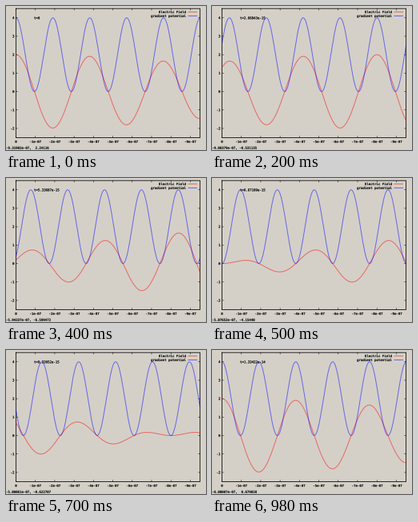
Animation of 250 by 181 pixels, one loop 1.08 s. Source, as a matplotlib script:

```python
import matplotlib.pyplot as plt
import numpy as np
from matplotlib.animation import FuncAnimation
from matplotlib.patches import PathPatch
from matplotlib.textpath import TextPath
from matplotlib.transforms import Affine2D

WIDTH, HEIGHT, DPI = 250, 181, 100
PX = 72 / DPI
LEFT, RIGHT, TOP, BOTTOM = 12.5, 242.5, 3.2, 165.5
Y_MIN, Y_MAX = -2.5, 4.5
X_END = 9.5
TICK = 2
FONT_SIZE = 4.05
ADVANCE = 0.602 * FONT_SIZE
CAP_HEIGHT = 0.73 * FONT_SIZE
INTERVAL, LOOP = 20, 1080
TIME_STEP = 1.334217e-15

READOUTS = [
    "-9.31902e-07,  2.24116", "-9.80379e-07,  0.174406",
    "-9.80379e-07, -0.531135", "-7.88214e-07, -3.56531",
    "-5.94337e-07, -6.599472", "-5.87652e-07, -4.15448",
    "-5.81464e-07, -1.70950", "-5.80861e-07, -0.622707",
    "-5.80258e-07,  0.464086", "-5.94132e-07,  0.571557",
    "-6.08007e-07,  0.679028",
]

fig = plt.figure(figsize=(WIDTH / DPI, HEIGHT / DPI), dpi=DPI,
                 facecolor="#d4d0c8")
ax = fig.add_axes([0, 0, 1, 1])
ax.set(xlim=(0, WIDTH), ylim=(HEIGHT, 0))
ax.axis("off")


def to_y(value):
    return BOTTOM - (value - Y_MIN) / (Y_MAX - Y_MIN) * (BOTTOM - TOP)


def line(xs, ys, color="black", width=0.5, alpha=1):
    return ax.plot(xs, ys, color=color, lw=width * PX, alpha=alpha,
                   snap=False)[0]


def curve(xs, ys, color):
    return line(xs, ys, color, width=1, alpha=0.5)


def text_path(x, y, text, align=0):
    """Text centred on y; align is the share of its width left of x."""
    path = TextPath((0, 0), text, size=FONT_SIZE,
                    prop={"family": "DejaVu Sans Mono"})
    place = Affine2D().scale(1, -1).translate(
        x - align * len(text) * ADVANCE, y + CAP_HEIGHT / 2)
    return place.transform_path(path)


def label(x, y, text, align=0):
    patch = PathPatch(text_path(x, y, text, align), facecolor="black",
                      edgecolor="black", lw=0.2 * PX)
    return ax.add_patch(patch)


def draw_axes():
    line([LEFT, RIGHT, RIGHT, LEFT, LEFT], [TOP, TOP, BOTTOM, BOTTOM, TOP],
         width=0.8)
    for value in range(-2, 5):
        y = to_y(value)
        line([LEFT, LEFT + TICK], [y, y])
        line([RIGHT - TICK, RIGHT], [y, y])
        label(10.5, y, str(value), 1)
    for i in range(10):
        x = LEFT + i / X_END * (RIGHT - LEFT)
        line([x, x], [BOTTOM, BOTTOM - TICK])
        line([x, x], [TOP, TOP + TICK])
        label(x, 170.5, f"-{i}e-07" if i else "0", 0.5)


def draw_legend():
    for y, text, color in ((7.5, "Electric Field", "red"),
                           (12.5, "gradient potential", "blue")):
        label(225, y, text, 1)
        curve([228, 238.5], [y, y], color)


draw_axes()
draw_legend()
distance = np.linspace(0, X_END, 201)
xs = LEFT + distance / X_END * (RIGHT - LEFT)
field = curve(xs, xs, "red")
potential = curve(xs, xs, "blue")
clock = label(35, 15, "t=0")
readout = label(0, 178.3, READOUTS[0])


def update(frame):
    ms = frame * INTERVAL
    step = 10 if ms >= 980 else min(ms // 100, 9)
    # Two waves, 10 and 11 cycles per 40 units, both moving 4 units a step.
    shifted = np.pi / 40 * (distance - 4 * step)
    carrier, envelope = np.cos(21 * shifted), np.cos(shifted)
    field.set_ydata(to_y(2 * carrier * envelope))
    potential.set_ydata(to_y(4 * carrier ** 2))
    clock.set_path(text_path(35, 15, f"t={step * TIME_STEP:g}"))
    readout.set_path(text_path(0, 178.3, READOUTS[step]))
    return field, potential, clock, readout


anim = FuncAnimation(fig, update, frames=LOOP // INTERVAL, interval=INTERVAL,
                     repeat=True, repeat_delay=0)
plt.show()
```
